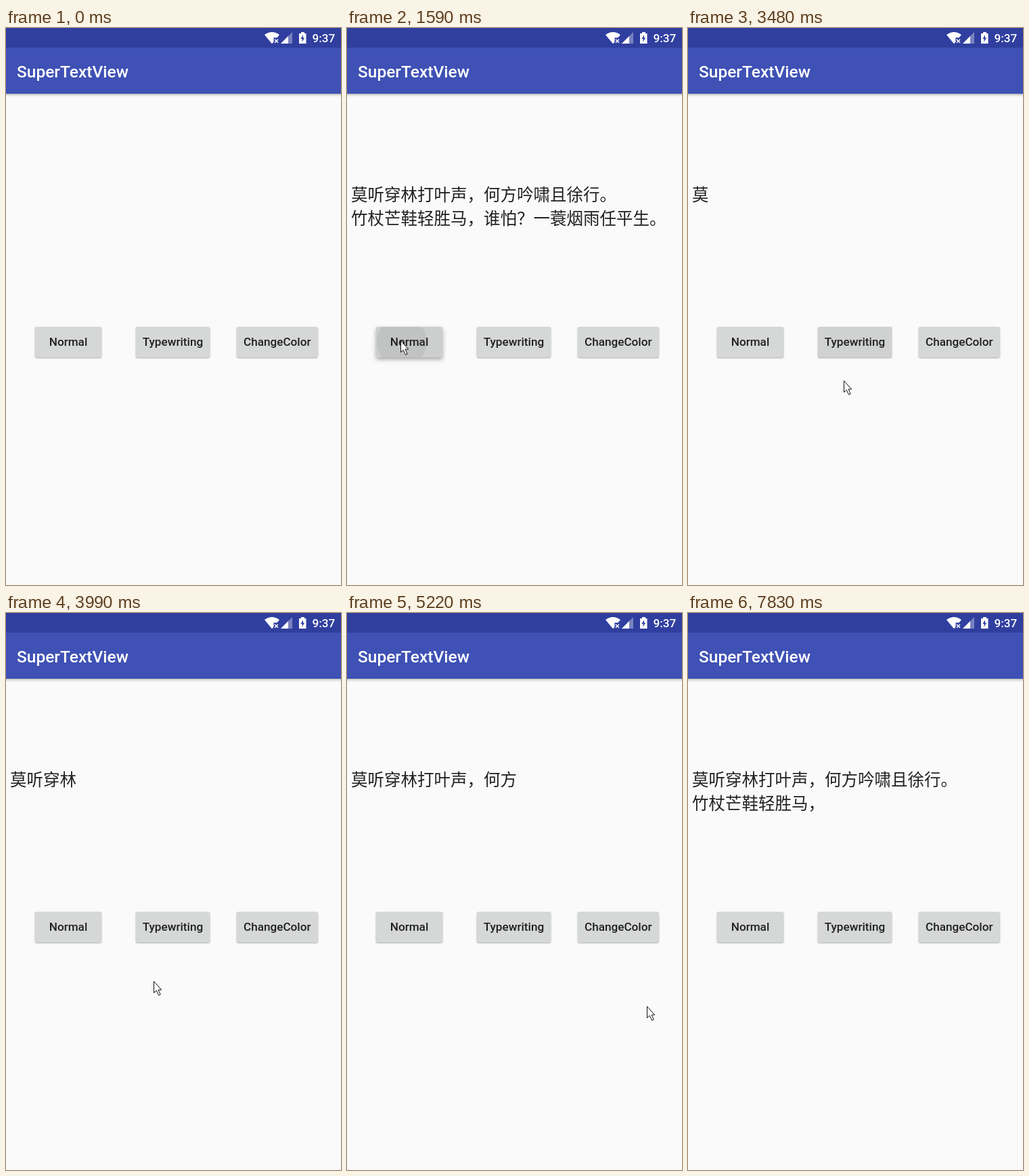
These frames come from a looping animation (495 px wide and 822 px high, 8000 ms). An HTML page:

```html
<!DOCTYPE html>
<html lang="zh-CN">
<head>
<meta charset="utf-8">
<title>SuperTextView</title>
<style>
html, body { margin: 0; height: 100%; overflow: hidden; background: #fafafa; }
svg { display: block; width: 100vw; height: 100vh; }
text { font-family: Roboto, sans-serif; font-weight: 500; }
.label { font-size: 17.15px; text-anchor: middle; fill: #212121; }
.verse { font: 400 24.5px "Noto Sans CJK SC", "Noto Sans CJK", sans-serif; fill: #212121; }
.bar { filter: drop-shadow(0 1.5px 2px rgba(0, 0, 0, .36)); }
</style>
</head>
<body>
<svg viewBox="0 0 495 822">
  <rect width="495" height="822" fill="#fafafa"/>
  <rect class="bar" x="-9" width="513" height="97" fill="#3f51b5"/>
  <rect width="495" height="29" fill="#303f9f"/>
  <g fill="#fff">
    <path d="M382 10Q393 2 404 10L400.5 14.3H395.5V20.5L393 23.3Z"/>
    <path d="M397 16.7l5 5m0-5l-5 5" stroke="#fff" stroke-width="1.5"/>
    <path d="M406 23H423V6Z" opacity=".35"/>
    <path d="M406 23H417V12Z"/>
    <path d="M436 6h5v2h2.5v15h-10.5v-15h3Z"/>
    <path d="M439 10.2l-3.6 5.8h2.1v4.4l3.6-6h-2.1Z" fill="#303f9f"/>
    <text x="452.5" y="21" font-size="17.15">9:37</text>
    <text x="16" y="73" font-size="24.5">SuperTextView</text>
  </g>
  <text class="verse" x="6" y="255"></text>
  <text class="verse" x="6" y="290"></text>
  <g id="buttons"></g>
  <path id="cursor" d="M.5 .7V17.6L4.2 14.2L7.6 21.2L10.2 20L7 13.1H11.7Z" fill="#fff" stroke="#111"/>
</svg>
<script>
const poem = "莫听穿林打叶声，何方吟啸且徐行。\n竹杖芒鞋轻胜马，谁怕？一蓑烟雨任平生。";
const verses = document.querySelectorAll(".verse");
const cursor = document.getElementById("cursor");
const LOOP = 8000, STEP = 30;
const SHOW = 1590, CLEAR = 3210, TYPE = 3245, PER_CHAR = 183;

// Pointer strokes, each a quadratic curve that starts where the last one ended
const home = [476, 66];
const strokes = [
  { from: 270, to: 960, bend: [222, 210], end: [79, 461] },
  { from: 1620, to: 2400, bend: [130, 612], end: [236, 449] },
  { from: 2640, to: 2730, bend: [236, 452], end: [236, 456] },
  { from: 3210, to: 3990, bend: [228, 575], end: [218, 543] },
  { from: 4140, to: 4320, bend: [226, 590], end: [248, 602] },
  { from: 4500, to: 5400, bend: [400, 620], end: [476, 559] }
];

// press lifts the shadow, tap starts the ripple at x
const buttons = [
  { name: "Normal", left: 43, width: 98, press: 1380, tap: 1590, x: 81 },
  { name: "Typewriting", left: 192, width: 109, press: 3150, tap: 3180, x: 238 },
  { name: "ChangeColor", left: 341, width: 119.5 }
];

const ramp = (t, a, b) => Math.max(0, Math.min(1, (t - a) / (b - a)));
const mix = (a, b, k) => a + (b - a) * k;

document.getElementById("buttons").innerHTML = buttons.map((b, i) => {
  const box = `x="${b.left}" y="441" width="${b.width}" height="45" rx="2"`;
  return `<clipPath id="clip${i}"><rect ${box}/></clipPath>
    <rect class="face" ${box} fill="#d6d7d7"/>
    <g class="ripple" clip-path="url(#clip${i})">
      <rect ${box} opacity=".045"/><circle cy="463.5" opacity=".06"/>
    </g>
    <text class="label" x="${b.left + b.width / 2}" y="469.3">${b.name}</text>`;
}).join("");
const faces = document.querySelectorAll(".face");
const ripples = document.querySelectorAll(".ripple");

function drawButton(b, i, t) {
  const lift = b.tap ? ramp(t, b.press, b.press + 60) * (1 - ramp(t, b.tap + 120, b.tap + 300)) : 0;
  faces[i].style.filter = `drop-shadow(0 ${1 + 2.5 * lift}px ${1 + 2.2 * lift}px rgba(0,0,0,.34))`;
  const age = ramp(t, b.tap, b.tap + 420);
  const on = t >= b.tap && age < 1;
  ripples[i].style.display = on ? "" : "none";
  if (!on) return;
  ripples[i].style.opacity = 1 - age;
  const circle = ripples[i].querySelector("circle");
  circle.setAttribute("cx", mix(b.x, b.left + b.width / 2, age));
  circle.setAttribute("r", mix(37, 120, age));
}

function drawCursor(t) {
  const shown = t >= strokes[0].from && t < strokes.at(-1).to;
  cursor.style.display = shown ? "" : "none";
  if (!shown) return;
  const i = strokes.findLastIndex(s => s.from <= t);
  const { from, to, bend, end } = strokes[i];
  const start = i ? strokes[i - 1].end : home;
  const k = ramp(t, from, to);
  const [x, y] = start.map((a, n) => Math.round(mix(mix(a, bend[n], k), mix(bend[n], end[n], k), k)));
  cursor.setAttribute("transform", `translate(${x} ${y})`);
}

function drawText(t) {
  let count = Math.max(0, Math.floor((t - TYPE) / PER_CHAR));
  if (t < CLEAR) count = t < SHOW ? 0 : poem.length;
  const parts = poem.slice(0, count).split("\n");
  verses.forEach((v, i) => v.textContent = parts[i] || "");
}

function frame() {
  const t = Math.floor(performance.now() % LOOP / STEP) * STEP;
  buttons.forEach((b, i) => drawButton(b, i, t));
  drawCursor(t);
  drawText(t);
  requestAnimationFrame(frame);
}
frame();
</script>
</body>
</html>
```
